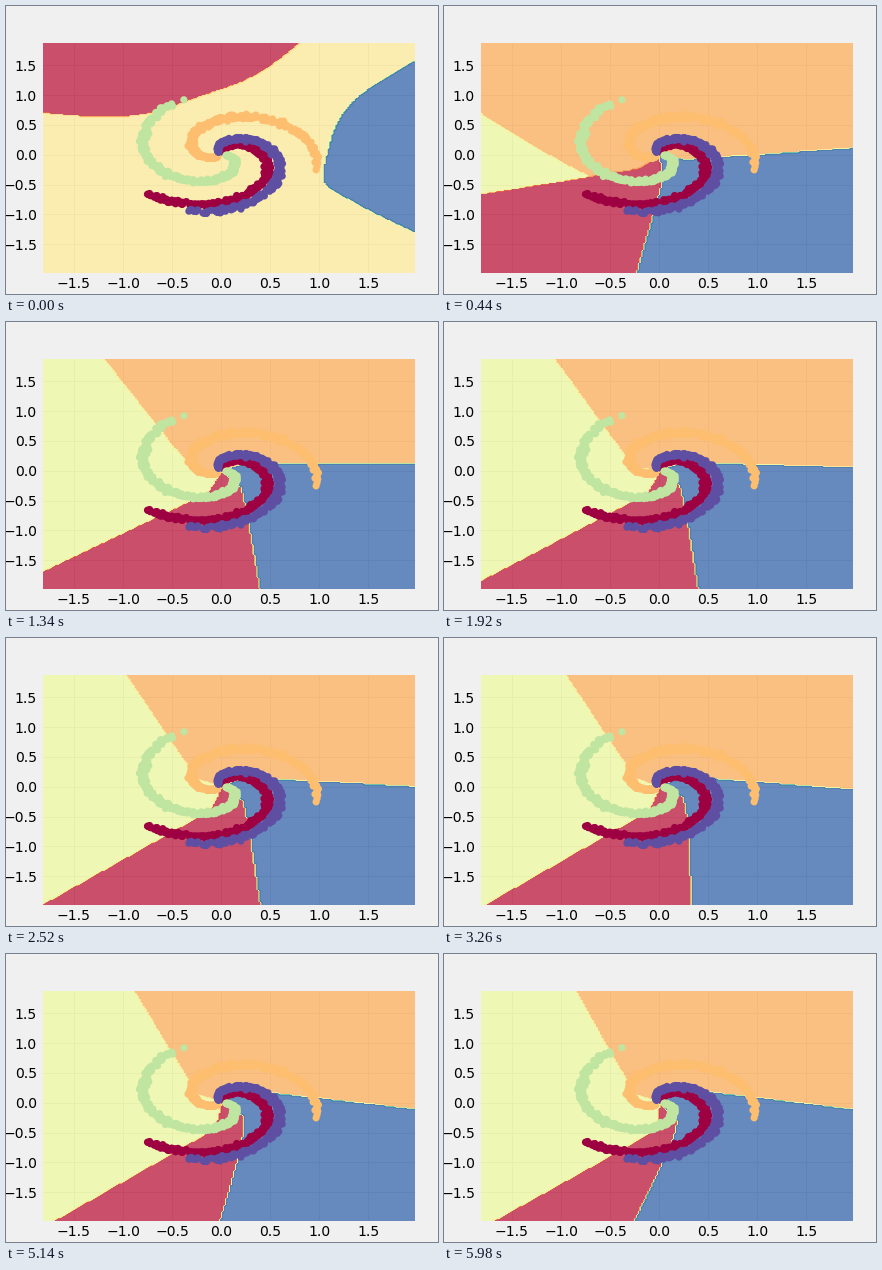
Write a matplotlib script that moves like this. It is 432 px wide and 288 px high and loops after 6000 ms.

```python
import numpy as np
import matplotlib.pyplot as plt
from matplotlib.animation import FuncAnimation

FRAMES, STEP = 300, 20
XLIM, YLIM = (-1.841, 1.99), (-1.994, 1.913)

plt.style.use("fivethirtyeight")
fig, ax = plt.subplots(figsize=(6, 4), dpi=72)


def spirals(n=320, classes=4, noise=0.08):
    rng = np.random.RandomState(0)
    r = np.linspace(0.05, 1, n)
    pts = []
    for k in range(classes):
        t = np.linspace(4 * k, 4 * k + 4, n) + rng.randn(n) * noise
        pts.append(np.c_[r * np.sin(t), r * np.cos(t)])
    return np.vstack(pts), np.repeat(np.arange(classes), n)


# Polar view of the grid: clockwise degrees, and curl = 100 px / radius
gx, gy = np.meshgrid(np.arange(*XLIM, 0.02), np.arange(*YLIM, 0.02))
px, py = 98 * (gx - 0.008), -59.7 * gy
theta = np.degrees(np.arctan2(py, px))
curl = 100 / np.maximum(np.hypot(px, py), 25)


def sector(mid, spread, tip, power, bend=0):
    """Both edges of a region that starts at radius `tip` and opens outwards."""
    q = np.minimum(curl * tip / 100, 1)
    axis = mid + bend * q ** 8
    half = spread * np.sqrt(1 - q ** power)
    return axis - half, axis + half


def untrained():
    blue_top, blue_end = sector(-2, 24.5, 103, 4, bend=11)
    top_left, top_right = sector(250.5, 61, 62, 2)
    return np.array([blue_end, blue_end, top_left, top_right, blue_top + 360])


# Trained borders are angle + bend * curl, listed clockwise:
# blue-red, red-green, green-orange, orange-blue
KEYS = {
    440: [(106, -6), (171, -6), (213, -37), (356, 4)],
    1340: [(80, -10), (154.5, -7.7), (232, -14), (360, -4)],
    2520: [(81.5, -12), (150.7, -8.4), (236, -10), (363, -5.8)],
    4320: [(96, -21), (149.6, -9), (237, -9.6), (366, -8)],
    5980: [(117, -18), (151, -13), (240.5, -10.7), (367, -9.5)],
}


def warp(ms):
    """Learning slows down over time."""
    return np.log1p(np.asarray(ms) / 200)


times = warp(list(KEYS))
values = np.array(list(KEYS.values())).reshape(len(KEYS), -1)


def trained(s):
    params = [np.interp(s, times, col) for col in values.T]
    br, rg, go, ob = [a + b * curl for a, b in zip(params[::2], params[1::2])]
    rg = np.maximum(rg, br)
    go = np.maximum(go, rg)
    ob = np.clip(ob, go, br + 360)
    return np.array([br, rg, go, ob, ob])


start = untrained()


def labels(ms):
    s = warp(ms)
    u = min(s / times[0], 1)
    br, rg, go, end, ob = start * (1 - u) + trained(s) * u
    phi = br + (theta - br) % 360
    return np.select([phi < rg, phi < go, phi < end, phi < ob], [0, 2, 1, 2], 3)


points, kind = spirals()
ax.scatter(*points.T, c=kind, s=10, linewidths=4, cmap="Spectral", zorder=2)
ax.set(xlim=XLIM, ylim=YLIM, xticks=np.arange(-1.5, 1.6, 0.5),
       yticks=np.arange(-1.5, 1.6, 0.5))
ax.autoscale(False)

field = None


def draw(frame):
    global field
    if field is not None:
        field.remove()
    field = ax.contourf(gx, gy, labels(frame * STEP), cmap="Spectral",
                        alpha=0.8, zorder=0.9)
    return [field]


anim = FuncAnimation(fig, draw, frames=FRAMES, interval=STEP,
                     init_func=lambda: [], repeat=True, repeat_delay=0)
plt.show()
```
